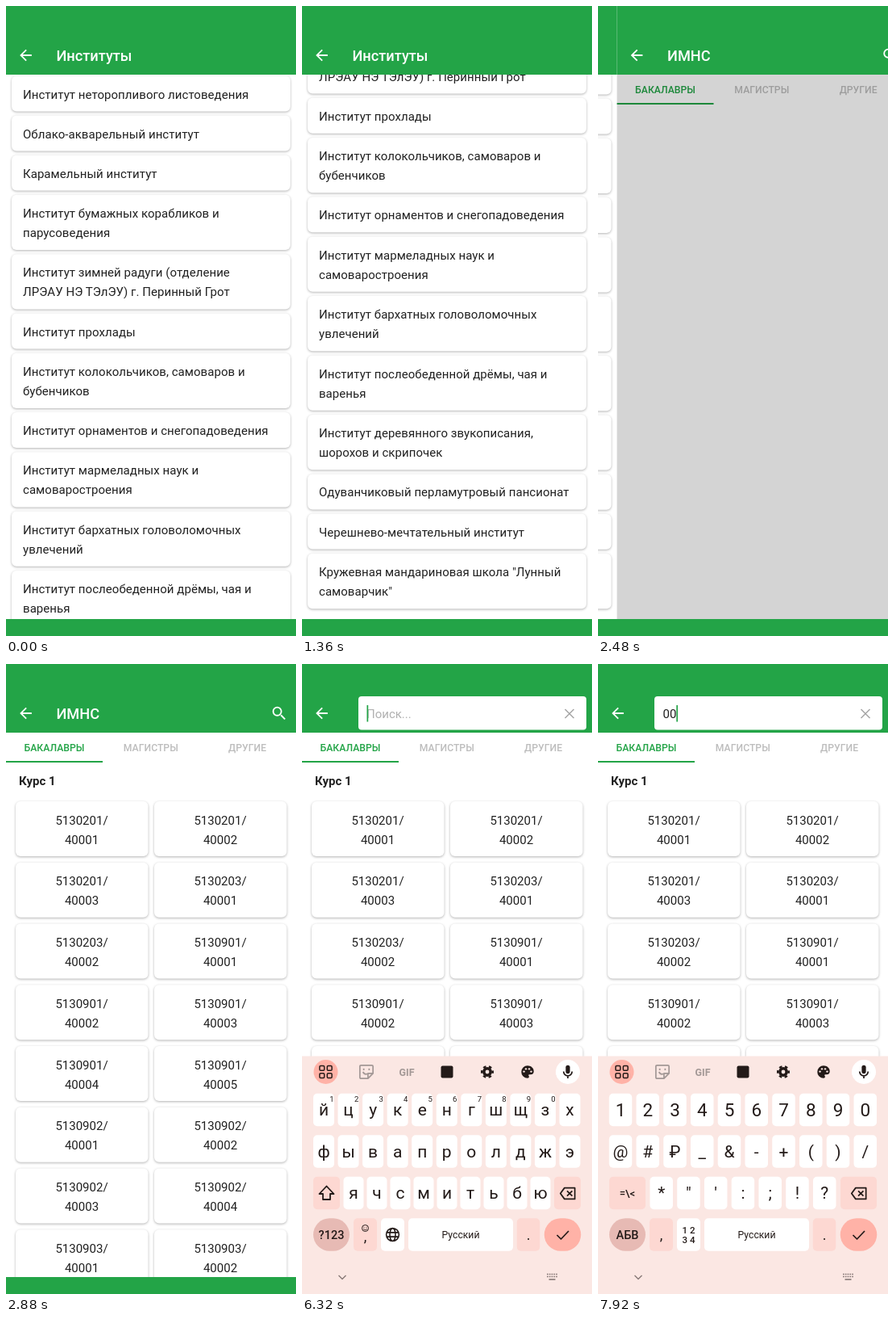
Write an HTML page that moves like this. It is 360x780 px and loops after 8 s.

```html
<!DOCTYPE html>
<html lang="ru">
<head>
<meta charset="utf-8">
<title>Институты</title>
<style>
  html, body { margin: 0; width: 100%; height: 100%; overflow: hidden; background: #fff; }
  svg { display: block; width: 100%; height: 100%; }
  text { font-family: Roboto, sans-serif; white-space: pre; }
  .cards { filter: drop-shadow(0 1px 1.4px rgba(0, 0, 0, .3)); }
</style>
</head>
<body>
<svg id="stage" viewBox="0 0 360 780"></svg>
<script>
const LOOP = 8000, STEP = 80;
const GREEN = '#23a447', INK = '#212121', KEY_INK = '#231a18';
const PANEL = '#fbe7e3', SOFT = '#fdd8d2', STRONG = '#ffb2a7', MODE = '#e7bab4';

const institutes = [
  'Институт неторопливого листоведения',
  'Облако-акварельный институт',
  'Карамельный институт',
  'Институт бумажных корабликов и|парусоведения',
  'Институт зимней радуги (отделение|ЛРЭАУ НЭ ТЭлЭУ) г. Перинный Грот',
  'Институт прохлады',
  'Институт колокольчиков, самоваров и|бубенчиков',
  'Институт орнаментов и снегопадоведения',
  'Институт мармеладных наук и|самоваростроения',
  'Институт бархатных головоломочных|увлечений',
  'Институт послеобеденной дрёмы, чая и|варенья',
  'Институт деревянного звукописания,|шорохов и скрипочек',
  'Одуванчиковый перламутровый пансионат',
  'Черешнево-мечтательный институт',
  'Кружевная мандариновая школа "Лунный|самоварчик"'
];
const groupCounts = [[201, 3], [203, 2], [901, 5], [902, 4], [903, 2]];

// Markup helpers; text is placed by the middle of its capitals.
const rect = (x, y, w, h, fill, r = 0, extra = '') =>
  `<rect x="${x}" y="${y}" width="${w}" height="${h}" rx="${r}" fill="${fill}" ${extra}/>`;
const circle = (x, y, r, fill, extra = '') => `<circle cx="${x}" cy="${y}" r="${r}" fill="${fill}" ${extra}/>`;
const text = (x, y, str, size, { fill = INK, weight = 400, anchor = 'start', extra = '' } = {}) =>
  `<text x="${x}" y="${y + size * .355}" font-size="${size}" fill="${fill}" font-weight="${weight}" text-anchor="${anchor}" ${extra}>${
    str.replace(/&/g, '&amp;').replace(/</g, '&lt;')}</text>`;
const mid = (x, y, str, size, opts) => text(x, y, str, size, { anchor: 'middle', ...opts });
const group = (id, body, extra = '') => `<g id="${id}" ${extra}>${body}</g>`;
const icon = (x, y, size, body, extra = '') =>
  `<g transform="translate(${x - size / 2} ${y - size / 2}) scale(${size / 24})" ${extra}>${body}</g>`;
const line = (d, color, width) =>
  `<path d="${d}" fill="none" stroke="${color}" stroke-width="${width}" stroke-linejoin="round"/>`;

const backArrow = icon(24.5, 61, 22,
  '<path fill="#fff" d="M20 11H7.83l5.59-5.59L12 4l-8 8 8 8 1.41-1.41L7.83 13H20z"/>');
const magnifier = icon(339, 61, 22,
  line('M14.5 14.5L20 20', '#fff', 2.1) + circle(9.5, 9.5, 5.5, 'none', 'stroke="#fff" stroke-width="2"'));
const header = rect(0, 0, 360, 85, GREEN) + backArrow;
const heading = str => text(62.5, 61.5, str, 18.2, { fill: '#fff', weight: 500 });

let nextTop = 86.5;
const listCards = institutes.map(entry => {
  const lines = entry.split('|');
  const height = 43.9 + (lines.length - 1) * 24.3;
  const card = { top: nextTop, height };
  card.markup = `<g class="entry">${rect(7, 0, 346, height, '#fff', 6)}${
    lines.map((str, i) => text(21, 22.7 + i * 24.2, str, 15, { extra: 'letter-spacing=".05"' })).join('')}</g>`;
  nextTop += height + 5.2;
  return card;
});

const groups = groupCounts.flatMap(([code, count]) =>
  Array.from({ length: count }, (_, i) => [`5130${code}/`, `${40001 + i}`]));
const groupCards = groups.map(([code, number], i) => {
  const x = i % 2 ? 184 : 12, y = 170 + Math.floor(i / 2) * 75.75;
  return rect(x, y, 164.5, 68, '#fff', 6) + mid(x + 82, y + 23.3, code, 15) + mid(x + 82, y + 47.3, number, 15);
}).join('');

const tabs = ['БАКАЛАВРЫ', 'МАГИСТРЫ', 'ДРУГИЕ'].map((label, i) =>
  mid(60 + i * 119.8, 104, label, 12.2, { fill: i ? '#bdbdbd' : GREEN, weight: 500 })).join('') +
  rect(0, 120, 120, 2, GREEN);

const searchBox = rect(70, 40, 283, 41.5, '#fff', 4) +
  line('M326.5 56L337.5 67M337.5 56L326.5 67', '#a6a6a6', 1.5) +
  text(80, 61.5, 'Поиск...', 15, { fill: '#b0b0b0', extra: 'id="hint"' }) +
  text(80.5, 61.5, '', 15, { extra: 'id="typed"' }) +
  rect(80.5, 51, 1.7, 20.5, GREEN, 0, 'id="caret"');

// Keyboard
const key = (cx, cy, w, fill = '#fff', r = 5) => rect(cx - w / 2, cy - 20.3, w, 40.6, fill, r);
const keyLabel = (x, y, str, size, weight = 400) => mid(x, y, str, size, { fill: KEY_INK, weight });
const keyRow = (chars, cy, x0, pitch, w, size) => [...chars].map((ch, i) =>
  key(x0 + i * pitch, cy, w) + keyLabel(x0 + i * pitch, cy, ch, size)).join('');
const backspace = (x, w) => key(x, 655, w, SOFT) +
  icon(x, 655.5, 22, line('M8 4.5H22V19.5H8L2.5 12ZM11.5 8.5L18.5 15.5M18.5 8.5L11.5 15.5', KEY_INK, 1.9));

const letters =
  keyRow('йцукенгшщзх', 552, 27, 30.55, 26, 21) +
  [...'1234567890'].map((d, i) => keyLabel(37 + i * 30.55, 538.5, d, 9.5)).join('') +
  keyRow('фывапролджэ', 603.5, 27, 30.55, 26, 21) +
  key(30.5, 655, 33, SOFT) + icon(30.5, 655, 24, line('M12 3.5L21 13H16.5V20H7.5V13H3Z', KEY_INK, 1.8)) +
  keyRow('ячсмитьбю', 655, 64, 29, 25, 21) + backspace(329.5, 33) +
  keyLabel(36.5, 706.5, '?123', 14.5, 500) +
  circle(78.5, 698.5, 4, 'none', `stroke="${KEY_INK}"`) +
  line('M76.3 699.5Q78.5 702 80.7 699.5M77 697.2V698M80 697.2V698', KEY_INK, .9) +
  keyLabel(78.5, 709, ',', 18) +
  icon(112.5, 706.5, 21, line('M3 12A9 9 0 1 0 21 12A9 9 0 1 0 3 12M8 12A4 9 0 1 0 16 12A4 9 0 1 0 8 12M4 9H20M4 15H20', KEY_INK, 1.8));

const symbols =
  keyRow('1234567890', 552, 28, 33.75, 28.5, 22.5) +
  keyRow('@#₽_&-+()/', 603.5, 28, 33.75, 28.5, 21) +
  key(36.5, 655, 45, SOFT) + keyLabel(36.5, 655.5, '=\\<', 13, 500) +
  keyRow('*"\':;!?', 655, 78.7, 33.75, 28.5, 21) + backspace(323.5, 45) +
  keyLabel(36.5, 706.5, 'АБВ', 14.5, 500) + keyLabel(78.5, 707, ',', 18) +
  keyLabel(112.5, 701, '1 2', 11.5, 500) + keyLabel(112.5, 712.5, '3 4', 11.5, 500);

const gridIcon = [24.8, 34.2].map(x => [500.3, 509.7].map(y =>
  rect(x - 2.9, y - 2.9, 5.8, 5.8, 'none', 1.3, `stroke="${KEY_INK}" stroke-width="1.5"`)).join('')).join('');
const stickerIcon = icon(80, 505, 23,
  line('M5 3.5H19Q20.5 3.5 20.5 5V14L14 20.5H5Q3.5 20.5 3.5 19V5Q3.5 3.5 5 3.5ZM14 20V14H20M7.5 12Q9.5 16 13 14.5M8.5 7.5V10M15.5 7.5V10', '#a39896', 1.8));
const gearIcon = circle(230, 505, 4.2, 'none', `stroke="${KEY_INK}" stroke-width="3.6"`) +
  circle(230, 505, 6.8, 'none', `stroke="${KEY_INK}" stroke-width="2.4" stroke-dasharray="3.6 3.52" stroke-dashoffset="1.8"`);
const paletteIcon = icon(280, 505, 19.5,
  `<path fill="${KEY_INK}" d="M12 2.5a9.5 9.5 0 0 0 0 19c2 0 3-2 1.8-3.5-.8-1.2 0-2 1.2-2h1.5a5 5 0 0 0 5-5c0-5-4.5-8.500-9.500-8.500z"/>` +
  [[6.5, 11.5], [9.5, 7.500], [14.5, 7.5], [17.500, 11.5]].map(([x, y]) => circle(x, y, 1.5, PANEL)).join(''));
const micIcon = icon(330, 505, 21,
  rect(9, 2.5, 6, 12, KEY_INK, 3) + line('M6 11.500A6 6 0 0 0 18 11.500M12 17.500V21', KEY_INK, 2));

const toolbar = circle(29.5, 505, 15, STRONG) + gridIcon + stickerIcon +
  mid(130, 505.3, 'GIF', 12.5, { fill: '#a39896', weight: 700 }) +
  rect(172.5, 497.5, 15, 15, KEY_INK, 2) +
  gearIcon + paletteIcon + circle(330, 505, 15, '#fff') + micIcon;
const bottomRow = key(36.5, 706.5, 45, MODE, 20.3) + key(78.5, 706.5, 29, SOFT) + key(112.5, 706.5, 29) +
  key(197, 706.5, 130) + keyLabel(197, 706.5, 'Русский', 12.2) +
  key(281, 706.5, 28.5, SOFT) + keyLabel(281, 707, '.', 18) +
  key(323.5, 706.5, 45.5, STRONG, 20.3) + line('M316.500 707L321.5 712L331 702', KEY_INK, 1.7);
const navBar = line('M45.5 757L50 761.5L54.5 757', '#857775', 1.3) +
  [755.5, 758.5].map(y => line(`M304 ${y}H317`, '#857775', '1.7" stroke-dasharray="1.7 1.1')).join('') +
  line('M306.500 762H314.500', '#857775', 1.6);

const stage = document.getElementById('stage');
stage.innerHTML =
  rect(0, 0, 360, 780, '#fff') +
  group('listPage',
    `<g class="cards">${listCards.map(card => card.markup).join('')}</g>` + header + heading('Институты')) +
  group('groupPage',
    group('groupList', text(16, 145, 'Курс 1', 15, { weight: 700 }) + `<g class="cards">${groupCards}</g>`) +
    tabs + rect(0, 85, 360, 674, '#000', 0, 'id="shade" opacity=".17"') + header +
    group('titleBar', heading('ИМНС') + magnifier) + group('search', searchBox)) +
  rect(0, 759, 360, 21, GREEN) +
  group('keyboard', rect(0, 485.5, 360, 295, PANEL) + toolbar + bottomRow +
    group('letters', letters) + group('symbols', symbols) + navBar);

const el = id => document.getElementById(id);
const show = (id, on) => el(id).setAttribute('display', on ? 'inline' : 'none');
const move = (id, x, y) => el(id).setAttribute('transform', `translate(${x} ${y})`);
const progress = (t, from, to) => Math.min(1, Math.max(0, (t - from) / (to - from)));
const easeInOut = p => p < .5 ? 4 * p ** 3 : 1 - 4 * (1 - p) ** 3;
const within = (t, from, to) => t >= from && t < to;
const entries = [...document.querySelectorAll('.entry')];

function scrollAt(t) {
  return 60 * progress(t, 800, 880) + 140 * progress(t, 880, 960) + 66 * progress(t, 960, 1040);
}

// Overscroll pulls the list upwards from its lower edge, then lets go.
function placeList(t) {
  const scroll = scrollAt(t);
  const pull = t < 1040 ? 0 : 21 * (1 - progress(t, 1040, 1440)) ** 2;
  const stretch = y => y - pull * (Math.max(0, 759 - y) / 621) ** .7;
  listCards.forEach(({ top, height }, i) => {
    const y0 = stretch(top - scroll), y1 = stretch(top + height - scroll);
    entries[i].setAttribute('transform', `translate(0 ${y0}) scale(1 ${(y1 - y0) / height})`);
  });
}

function draw(t) {
  placeList(t);
  const slide = 360 * easeInOut(progress(t, 1980, 2650));
  move('listPage', -slide, 0);
  move('groupPage', 360 - slide, 0);
  show('groupList', t >= 2720);
  show('shade', t < 2720);

  show('titleBar', t < 5520);
  show('search', t >= 5600);
  const hidden = (1 - progress(t, 5600, 5920)) ** 3;
  show('keyboard', t >= 5600);
  move('keyboard', 0, 295 * hidden);
  show('letters', t < 6720);
  show('symbols', t >= 6720);

  const count = (t >= 7680) + (t >= 7920);
  el('typed').textContent = '0'.repeat(count);
  show('hint', !count);
  el('caret').setAttribute('x', 80.5 + 8.42 * count);
  show('caret', within(t, 5600, 5840) || within(t, 6320, 6880) || t >= 7280);
}

const start = performance.now();
function tick() {
  const t = (performance.now() - start) % LOOP;
  draw(Math.floor(t / STEP) * STEP);
  requestAnimationFrame(tick);
}
tick();
</script>
</body>
</html>
```
